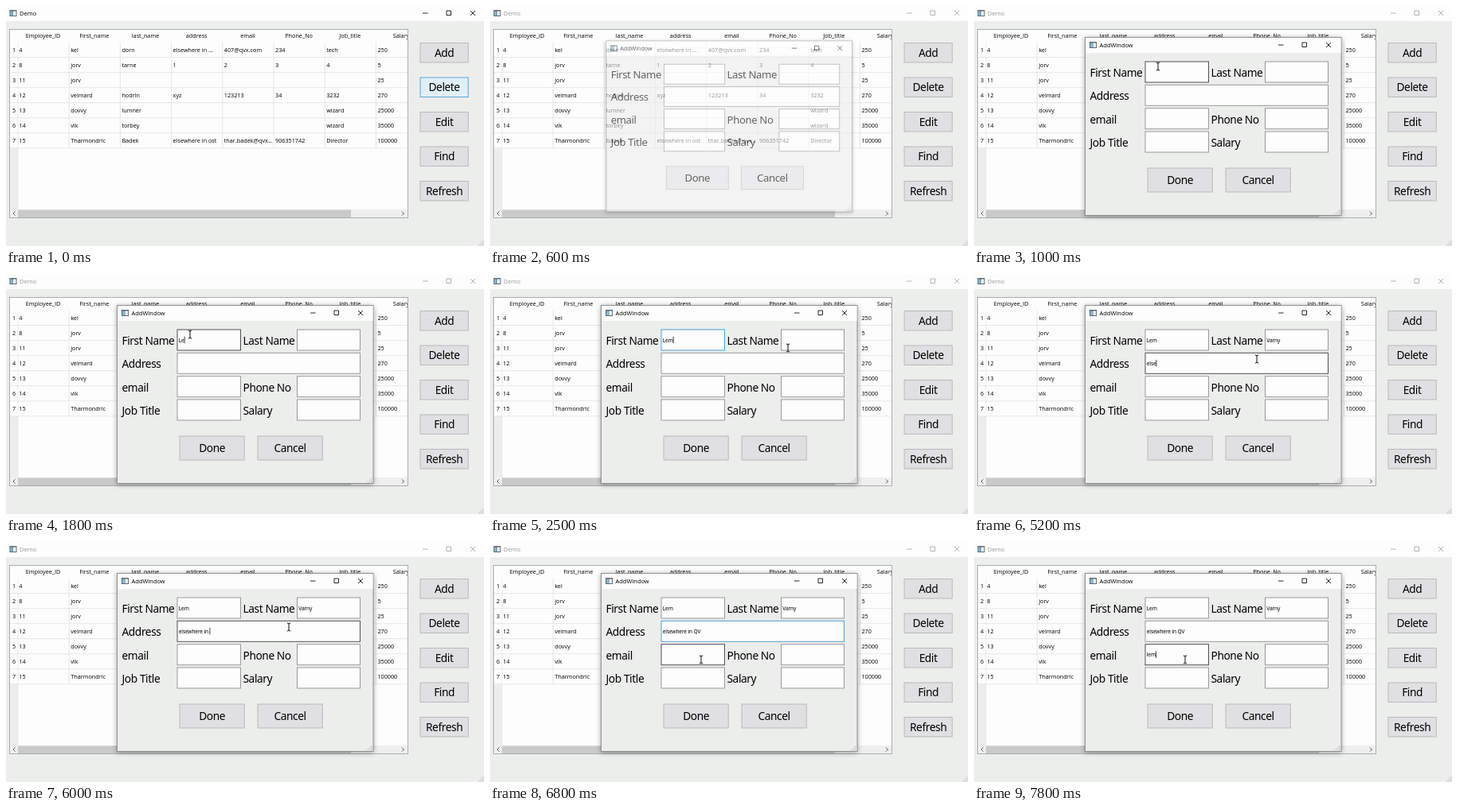
Recreate the animation shown at these times as an HTML page. Size 600 by 302 pixels, loop 8 s.

```html
<!DOCTYPE html>
<html lang="en">
<head>
<meta charset="utf-8">
<title>Employee form</title>
<style>
html, body { margin: 0; width: 100%; height: 100%; overflow: hidden; background: #eceeec; }
svg { display: block; width: 100vw; height: 100vh; }
text { fill: #000; white-space: pre; }
.cell { font: 7.25px "Open Sans", sans-serif; }
.title { font: 7.5px "Open Sans", sans-serif; }
.big { font: 13.7px "Noto Sans", sans-serif; letter-spacing: -.4px; }
.typed { font: 6.6px "Noto Sans", sans-serif; letter-spacing: -.15px; }
.mid { text-anchor: middle; }
.btn rect { fill: #e0dfe2; stroke: #b9b9ba; }
.btn.hover rect { fill: #e1eff7; stroke: #5ba6d6; }
.field { fill: #fdfdfd; stroke: #999; }
.field.hover { stroke: #505050; }
.field.focus { stroke: #4f9fd6; }
.ctl { fill: none; stroke: #111; stroke-width: .9; }
.idle text { fill: #999; }
.idle .ctl { stroke: #aaa; }
</style>
</head>
<body>
<svg viewBox="0 0 600 302" id="stage"></svg>
<script>
const NS = 'http://www.w3.org/2000/svg';
const LOOP = 8000, STEP = 100;
const stage = document.getElementById('stage');

function add(parent, tag, attrs = {}, text) {
  const el = document.createElementNS(NS, tag);
  for (const k in attrs) el.setAttribute(k, attrs[k]);
  if (text !== undefined) el.textContent = text;
  parent.appendChild(el);
  return el;
}
const rect = (p, x, y, width, height, attrs) => add(p, 'rect', { x, y, width, height, ...attrs });
const path = (p, d, attrs) => add(p, 'path', { d, fill: 'none', ...attrs });
const label = (p, x, y, cls, text) => add(p, 'text', { x, y, class: cls }, text);

function button(p, x, y, w, h, text) {
  const g = add(p, 'g', { class: 'btn' });
  rect(g, x, y, w, h);
  label(g, x + w / 2, y + h / 2 + 5, 'big mid', text);
  return g;
}

// Icon, caption and the three window controls
function titleBar(p, x, y, text, xMin) {
  const g = add(p, 'g');
  rect(g, x, y - 4, 9, 8, { fill: '#5d6973' });
  rect(g, x + 1, y - 2.5, 3, 5.5, { fill: '#7fb9d3' });
  rect(g, x + 4.5, y - 2.5, 3.5, 5.5, { fill: '#f4f7f8' });
  label(g, x + 12.5, y + 2.7, 'title', text);
  path(g, `M${xMin} ${y}h6.5M${xMin + 30} ${y - 3}h5.5v5.5h-5.5zM${xMin + 60} ${y - 3}l6 6m0 -6l-6 6`, { class: 'ctl' });
  return g;
}

function grip(p, x, y) {
  for (let i = 0; i < 3; i++)
    for (let j = 0; j <= i; j++) rect(p, x - j * 2.2, y - (2 - i) * 2.2, 1.2, 1.2, { fill: '#b5b5b5' });
}

// Main window
rect(stage, 0, 0, 600, 302, { fill: '#eceeec' });
rect(stage, 0, 0, 600, 19, { fill: '#fdfdfd' });
const mainBar = titleBar(stage, 4.5, 9, 'Demo', 523);
grip(stage, 598, 300);

const COL = 64.2, ROW = 19.05, LEFT = 15, TOP = 45.5;
const heads = ['Employee_ID', 'First_name', 'last_name', 'address', 'email', 'Phone_No', 'Job_title', 'Salary'];
const rows = [
  ['4', 'kel', 'dorn', 'elsewhere in ...', '407@qvx.com', '234', 'tech', '250'],
  ['8', 'jorv', 'tarne', '1', '2', '3', '4', '5'],
  ['11', 'jorv', '', '', '', '', '', '25'],
  ['12', 'velmard', 'hodrin', 'xyz', '123213', '34', '3232', '270'],
  ['13', 'dovvy', 'lumner', '', '', '', 'wizard', '25000'],
  ['14', 'vik', 'torbey', '', '', '', 'wizard', '35000'],
  ['15', 'Tharmondric', 'Badek', 'elsewhere in ost', 'thar.badek@qvx...', '906351742', 'Director', '100000']
];
rect(stage, 4.5, 29.5, 500, 237, { fill: '#fdfdfd' });
rect(add(stage, 'clipPath', { id: 'view' }), 5, 30, 499, 236);
const table = add(stage, 'g', { 'clip-path': 'url(#view)' });
const bottom = TOP + rows.length * ROW;
rect(table, 5, bottom, 10, 256 - bottom, { fill: '#eceeec' });
path(table, `M15 ${TOP}V256`, { stroke: '#e3e3e3', 'stroke-width': .6 });
heads.forEach((h, c) => {
  const x = LEFT + c * COL;
  label(table, x + COL / 2 - .5, 40, 'cell mid', h);
  path(table, `M${x + COL} ${TOP}V${bottom}`, { stroke: '#dedede', 'stroke-width': .7 });
});
rows.forEach((row, r) => {
  const y = TOP + r * ROW;
  label(table, 10, y + 12.5, 'cell mid', r + 1);
  row.forEach((v, c) => label(table, LEFT + c * COL + (c ? 2 : 1.3), y + 12, 'cell', v));
  path(table, `M5 ${y + ROW}H504`, { stroke: '#dedede', 'stroke-width': .7 });
});
rect(table, 5, 256, 499, 10.5, { fill: '#efefef' });
rect(table, 15, 256.5, 418, 9.5, { fill: '#cacaca' });
path(table, 'M11.5 258.5l-2.5 2.5l2.5 2.5M497 258.5l2.5 2.5l-2.5 2.5', { stroke: '#555' });
rect(stage, 4.5, 29.5, 500, 237, { fill: 'none', stroke: '#979b9f', 'stroke-width': .8 });

const [addBtn, deleteBtn] = ['Add', 'Delete', 'Edit', 'Find', 'Refresh']
  .map((s, i) => button(stage, 520, 46.5 + i * 43.5, 60.2, 24.5, s));

// Dialog
const dialog = add(stage, 'g');
rect(dialog, 139.5, 39.5, 321.5, 224, {
  fill: '#eceeec', stroke: '#888', 'stroke-width': .9, style: 'filter:drop-shadow(0 1.5px 3px rgba(0,0,0,.35))'
});
rect(dialog, 140, 40, 320.5, 19, { fill: '#fdfdfd' });
titleBar(dialog, 145, 49, 'AddWindow', 382);
grip(dialog, 458, 261);
button(dialog, 218, 204, 81.2, 30, 'Done');
button(dialog, 316, 204, 81.2, 30, 'Cancel');

const forms = [
  ['First Name', 145.5, 215, 70, 79.5],
  ['Last Name', 297.5, 365.5, 70, 79],
  ['Address', 145.5, 215, 99.3, 229.5],
  ['email', 145.5, 215, 128.7, 79.5],
  ['Phone No', 297.5, 365.5, 128.7, 79],
  ['Job Title', 145.5, 215, 158, 79.5],
  ['Salary', 297.5, 365.5, 158, 79]
].map(([name, lx, x, y, w]) => {
  label(dialog, lx, y + 18.8, 'big', name);
  return {
    x: x + 1.8, y,
    box: rect(dialog, x, y, w, 26, { class: 'field' }),
    text: label(dialog, x + 1.8, y + 15.5, 'typed', '')
  };
});
const caret = rect(dialog, 0, 0, .8, 8.5, { fill: '#111' });
const beam = path(stage, 'M-2.2 -5Q0 -5 0 -3.8Q0 -5 2.2 -5M0 -4.5V4.5M-2.2 5Q0 5 0 3.8Q0 5 2.2 5',
  { stroke: '#111', 'stroke-width': 1 });

// Per field: text, key times, hover span, focus span, caret span
const script = [
  { text: 'Lem', keys: [1600, 1800, 2000], hover: [800, 2300], focus: [2300, 2800], caret: [1500, 2700] },
  { text: 'Varny', keys: [3000, 3100, 3200, 3400, 3600], hover: [2600, 4100], focus: [4100, 4600], caret: [2800, 4000] },
  { text: 'elsewhere in QV', keys: [4900, 5000, 5100, 5200, 5300, 5400, 5500, 5600, 5700, 5800, 5900, 6000, 6000, 6100, 6200],
    hover: [4100, 6700], focus: [6700, 7200], caret: [4600, 6600] },
  { text: 'lem', keys: [7600, 7600, 7800], hover: [6700, LOOP], focus: [LOOP, LOOP], caret: [7400, LOOP] }
];
// Pointer stops: time, x, y
const stops = [[800, 262, 70], [1000, 231, 76], [2200, 231, 76], [2500, 374, 93], [2800, 376, 90],
  [3900, 376, 90], [4000, 362, 103], [4300, 355, 107], [6600, 355, 107], [6800, 265, 148], [LOOP, 265, 148]];

const within = (t, [a, b]) => t >= a && t < b;

function pointer(t) {
  const i = Math.max(1, stops.findIndex(s => s[0] >= t));
  const [t0, x0, y0] = stops[i - 1], [t1, x1, y1] = stops[i];
  const k = Math.max(0, (t - t0) / (t1 - t0));
  return [x0 + (x1 - x0) * k, y0 + (y1 - y0) * k];
}

function draw(t) {
  mainBar.classList.toggle('idle', t >= 600);
  deleteBtn.classList.toggle('hover', t < 200);
  addBtn.classList.toggle('hover', within(t, [200, 600]));

  const open = t < 600 ? 0 : t < 700 ? .6 : 1;
  const scale = .9 + .1 * open;
  dialog.setAttribute('opacity', open);
  dialog.setAttribute('transform', `translate(300.5 152) scale(${scale}) translate(-300.5 -152)`);

  caret.setAttribute('visibility', 'hidden');
  script.forEach((s, i) => {
    const f = forms[i];
    f.text.textContent = s.text.slice(0, s.keys.filter(k => k <= t).length);
    f.box.classList.toggle('hover', within(t, s.hover));
    f.box.classList.toggle('focus', within(t, s.focus));
    if (within(t, s.caret)) {
      const w = f.text.textContent ? f.text.getComputedTextLength() : 0;
      caret.setAttribute('x', f.x + w);
      caret.setAttribute('y', f.y + 8.7);
      caret.setAttribute('visibility', 'visible');
    }
  });

  beam.setAttribute('visibility', t < 800 ? 'hidden' : 'visible');
  beam.setAttribute('transform', `translate(${pointer(t)})`);
}

const start = performance.now();
function tick() {
  const t = (performance.now() - start) % LOOP;
  draw(Math.floor(t / STEP) * STEP);
  requestAnimationFrame(tick);
}
tick();
</script>
</body>
</html>
```
